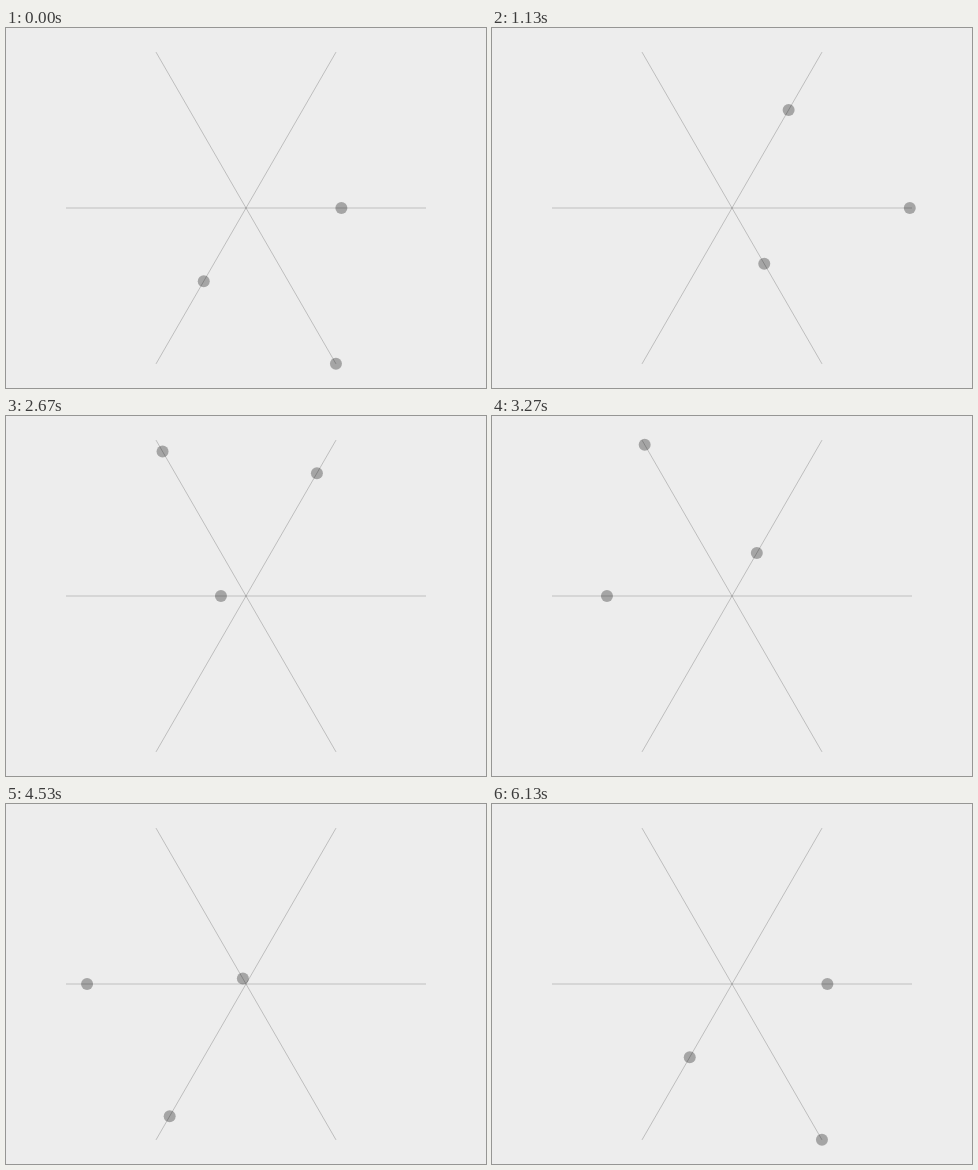
Animation, 480 px wide and 360 px high, one loop 6190 ms. Source, as an HTML page with a canvas:

```html
<!DOCTYPE html>
<html>
<head>
<meta charset="utf-8">
<style>
  html, body { margin: 0; height: 100%; overflow: hidden; }
  canvas { display: block; }
</style>
</head>
<body>
<canvas width="480" height="360"></canvas>
<script>
const ctx = document.querySelector('canvas').getContext('2d');
const LOOP = 6190, STEP = 200 / 3, LAST = 92;
const R = 180, CX = 240, CY = 180;
const START = 58, TURN = 3.912; // degrees, degrees per step
const AXES = [0, 60, -60];
const rad = deg => deg * Math.PI / 180;

function draw() {
  const t = performance.now() % LOOP;
  const step = Math.min(LAST, Math.floor((t + 3.4) / STEP));
  const angle = START - Math.round(TURN * step);

  ctx.fillStyle = '#ededed';
  ctx.fillRect(0, 0, 480, 360);
  ctx.strokeStyle = 'rgba(0,0,0,.2)';
  ctx.fillStyle = 'rgba(0,0,0,.3)';

  for (const axis of AXES) {
    const dx = R * Math.cos(rad(axis)), dy = R * Math.sin(rad(axis));
    ctx.beginPath();
    ctx.moveTo(CX - dx, CY - dy);
    ctx.lineTo(CX + dx, CY + dy);
    ctx.stroke();

    // each dot is the projection of one circling point onto its axis
    const k = Math.cos(rad(angle - axis));
    ctx.beginPath();
    ctx.arc(CX + dx * k, CY + dy * k, 6, 0, 2 * Math.PI);
    ctx.fill();
  }
  requestAnimationFrame(draw);
}
draw();
</script>
</body>
</html>
```
